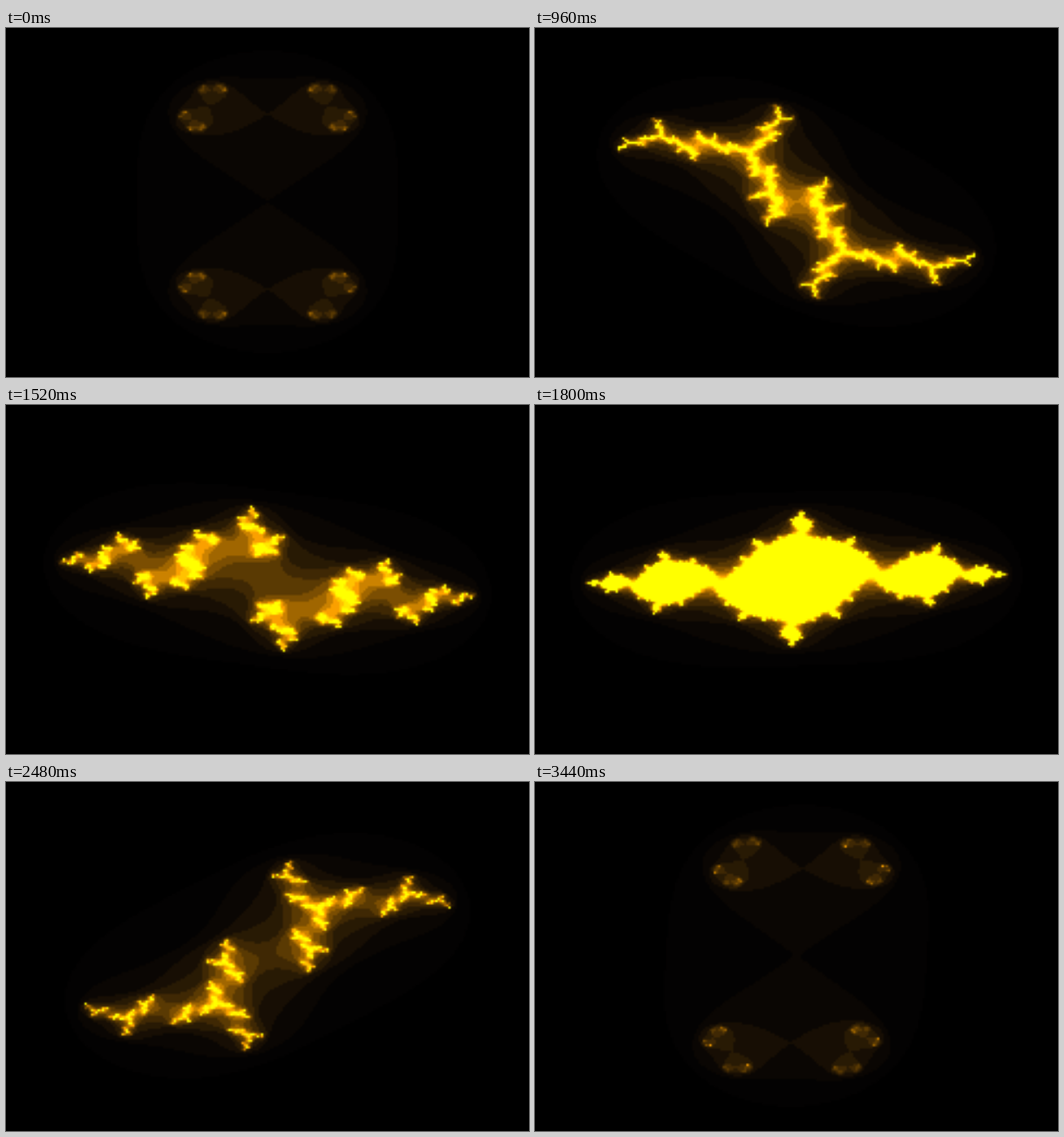
These frames come from a looping animation (600x400 px, 3480 ms). An HTML page with a canvas:

```html
<!DOCTYPE html>
<html lang="en">
<head>
<meta charset="utf-8">
<title>Julia set</title>
<style>
  html, body { margin: 0; width: 100%; height: 100%; overflow: hidden; background: #000; }
  canvas { display: block; width: 600px; height: 397.5px; }
</style>
</head>
<body>
<canvas id="view" width="240" height="159"></canvas>
<script>
  const STEP = 40, STEPS = 87, TURN = 0.072;
  const MAX_ITER = 14;
  const canvas = document.getElementById('view');
  const { width, height } = canvas;
  const ctx = canvas.getContext('2d');
  const image = ctx.createImageData(width, height);
  const pixels = new Uint32Array(image.data.buffer);

  // Black through brown and orange to yellow, one colour per escape count.
  const palette = Array.from({ length: MAX_ITER + 1 }, (_, n) => {
    const r = Math.min(255, Math.round(2.5 * n * n));
    const g = Math.min(255, Math.round(1.6 * n * n));
    const b = Math.max(0, Math.round(0.25 * n * (8 - n)));
    return (255 << 24 | b << 16 | g << 8 | r) >>> 0;
  });

  function escapeCount(x, y, cx, cy) {
    for (let n = 0; n < MAX_ITER; n++) {
      const nx = x * x - y * y + cx;
      y = 2 * x * y + cy;
      x = nx;
      if (x * x + y * y > 4) return n;
    }
    return MAX_ITER;
  }

  // The constant c travels round the unit circle.
  function draw(step) {
    const cx = Math.cos(step * TURN), cy = Math.sin(step * TURN);
    for (let row = 0, i = 0; row < height; row++) {
      const y = (height / 2 - row - 0.5) / 40;
      for (let col = 0; col < width; col++, i++) {
        const x = (col + 0.5 - width / 2) / 60;
        pixels[i] = palette[escapeCount(x, y, cx, cy)];
      }
    }
    ctx.putImageData(image, 0, 0);
  }

  let start = null, shown = -1;
  function tick() {
    const now = performance.now();
    if (start === null) start = now;
    const step = Math.floor((now - start) / STEP) % STEPS;
    if (step !== shown) draw(shown = step);
    requestAnimationFrame(tick);
  }
  tick();
</script>
</body>
</html>
```
